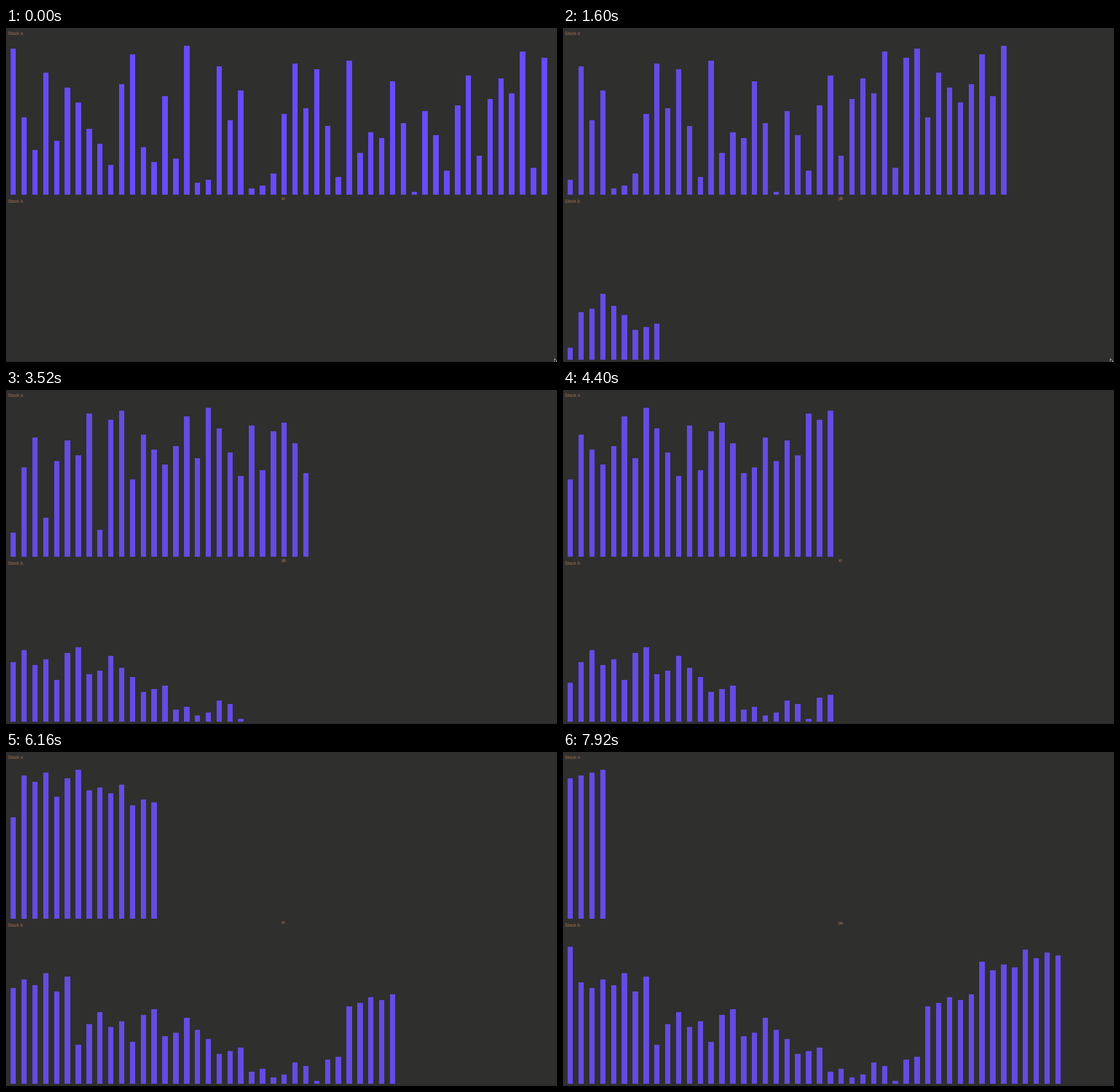
Write a matplotlib script that moves like this. It is 960 px wide and 583 px high and loops after 8000 ms.

```python
import numpy as np
import matplotlib.pyplot as plt
from matplotlib.animation import FuncAnimation
from matplotlib.patches import Polygon, Rectangle

W, H, DPI = 960, 583, 100
FRAMES, INTERVAL = 100, 80
BACKGROUND, TEXT = "#2f2f2e", "#a9754f"
BRIGHT_BAR, BAR = "#694bfb", "#664be3"
LEFT, PITCH, UNIT = 8, 18.88, 5.2
BASE_A, BASE_B = 290.9, 578.9

START = [49, 26, 15, 41, 18, 36, 31, 22, 17, 10, 37, 47, 16, 11, 33, 12, 50,
         4, 5, 43, 25, 35, 2, 3, 7, 27, 44, 29, 42, 23, 6, 45, 14, 21, 19,
         38, 24, 1, 28, 20, 8, 30, 40, 13, 32, 39, 34, 48, 9, 46]
# Each chunk: highest rank pushed, highest rank sent to the bottom of b.
CHUNKS = [(25, 12), (37, 30), (47, 41)]


def sort_states():
    """Run the chunked two-stack sort and list (operation, a, b) per step."""
    a, b = START[:], []
    states = [("ra", a[:], b[:])]

    def run(op):
        if op == "pb":
            b.insert(0, a.pop(0))
        elif op == "pa":
            a.insert(0, b.pop(0))
        if op in ("ra", "rr"):
            a.append(a.pop(0))
        if op in ("rb", "rr"):
            b.append(b.pop(0))
        states.append((op, a[:], b[:]))

    for limit, low in CHUNKS:
        while min(a) <= limit:
            if a[0] > limit:
                run("ra")
                continue
            run("pb")
            if b[0] <= low:
                run("rr" if a[0] > limit and len(a) > 3 else "rb")
    while b[0] != max(b):
        run("rb")
    run("pa")
    return states


STATES = sort_states()


def step_at(frame):
    """Steps done by a frame; the pace drifts slightly."""
    pace = np.interp(frame, [0, 20, 30, 44, 66, 77, 88, 99],
                     [0, 18, 28, 43, 66, 76, 88, 99])
    return min(int(pace + 1e-6), len(STATES) - 1)


plt.rcParams["text.hinting"] = "none"
fig = plt.figure(figsize=((W + 0.01) / DPI, (H + 0.01) / DPI), dpi=DPI,
                 facecolor=BACKGROUND)
ax = fig.add_axes([0, 0, 1, 1])
ax.set_xlim(0, W)
ax.set_ylim(H, 0)
ax.axis("off")


def label(x, y, text):
    # The script letter gives a single-storey "a".
    return ax.text(x, y, text.replace("a", "\u0251"), color=TEXT,
                   family=["Liberation Sans", "DejaVu Sans"],
                   size=8 * 72 / DPI, va="baseline")


label(3.3, 12, "Stack a")
label(3.3, 304.7, "Stack b")
op_label = label(479.7, 300, "ra")

ax.add_patch(Rectangle((0, H - 1), W, 1, color="#262626", lw=0))
bars = {rank: ax.add_patch(Rectangle((0, 0), PITCH / 2, rank * UNIT, lw=0))
        for rank in START}
CURSOR = np.array([(0, 0), (0, 8), (2, 6), (5, 5.2)])
cursor = ax.add_patch(Polygon(CURSOR, fc="#111111", ec="#c8c8c8", lw=0.6,
                              zorder=3))


def update(frame):
    op, a, b = STATES[step_at(frame)]
    for stack, base in ((a, BASE_A), (b, BASE_B)):
        for i, rank in enumerate(stack):
            bars[rank].set_xy((LEFT + i * PITCH, base - rank * UNIT))
            bars[rank].set_facecolor(BAR if frame else BRIGHT_BAR)
    op_label.set_text(op.replace("a", "\u0251"))
    cursor.set_xy(CURSOR + (955.5 if frame < 10 else 953.5, 577))
    cursor.set_visible(frame < 25)
    return [*bars.values(), op_label, cursor]


anim = FuncAnimation(fig, update, frames=FRAMES, interval=INTERVAL,
                     repeat=True, repeat_delay=0, blit=False)
plt.show()
```
